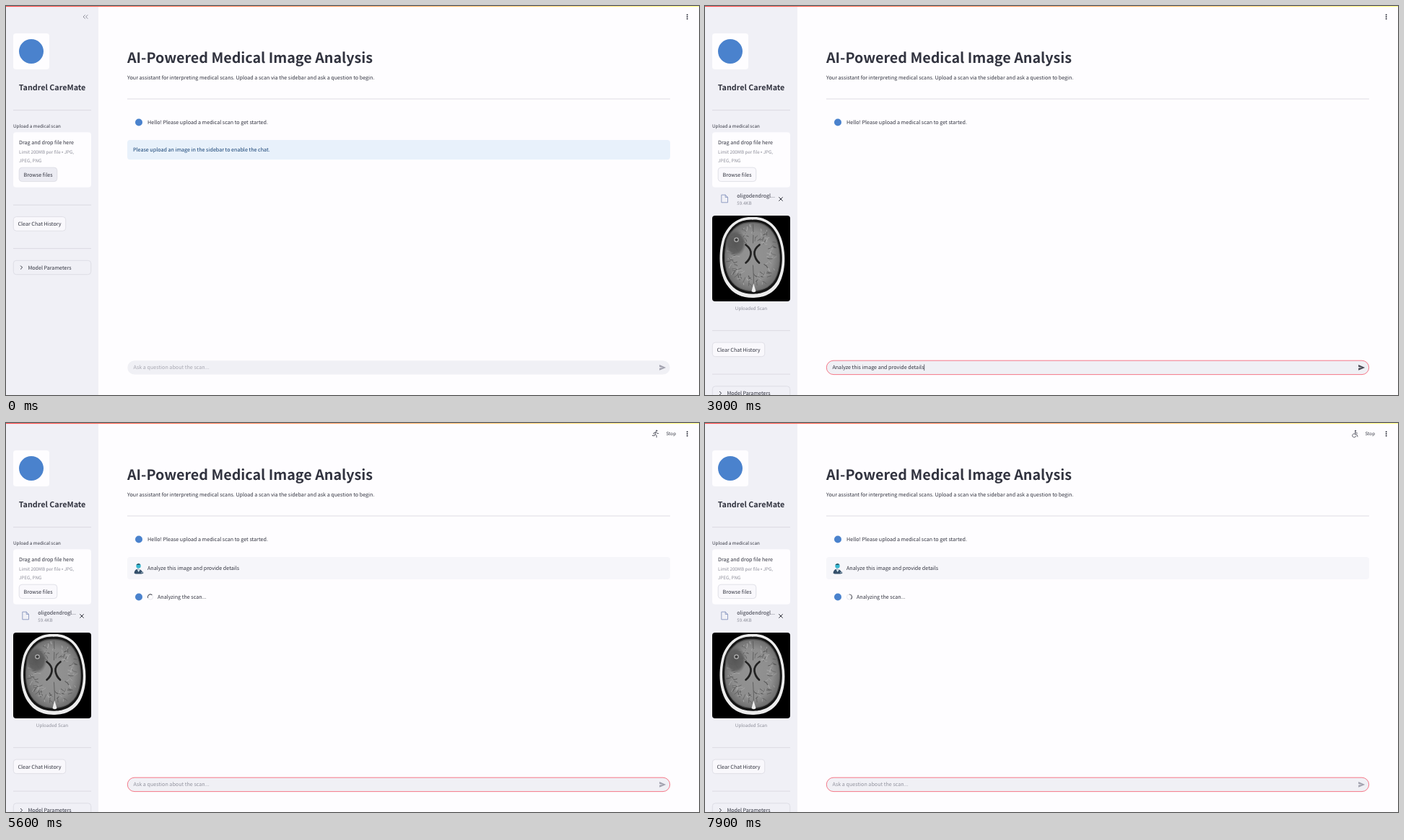
An HTML page that plays this animation: 960x540 px, repeating every 8 s.

```html
<!DOCTYPE html>
<html lang="en">
<head>
<meta charset="utf-8">
<title>Medical image assistant</title>
<style>
  html, body { margin: 0; width: 100%; height: 100%; overflow: hidden; background: #fefdff; }
  svg { display: block; width: 960px; height: 540px; }
  /* The Latin letters of the CJK face are wide for their size, hence the odd values. */
  text { font: 7.16px "Noto Sans CJK JP", "Noto Sans CJK SC", "Noto Sans CJK", "Open Sans", sans-serif;
         fill: #31333f; text-rendering: geometricPrecision; white-space: pre; }
  .small { font-size: 6.27px; }
  .dim { fill: #8c8d98; }
  .mid { text-anchor: middle; }
  .h1 { font-size: 19.7px; font-weight: 700; }
  .h2 { font-size: 10.74px; font-weight: 600; }
  .bullet { font-family: "Liberation Sans", sans-serif; }
  .rule { stroke: #dad9e0; stroke-width: .9; }
  .box { fill: #f9f8fc; stroke: #d6d6de; stroke-width: .7; }
  .line { fill: none; stroke-linecap: round; stroke-linejoin: round; }
  .mark { fill: #4a82cd; }
</style>
</head>
<body>
<svg viewBox="0 0 960 540" xmlns="http://www.w3.org/2000/svg">
  <defs>
    <linearGradient id="stripe"><stop stop-color="#ff4b4b"/><stop offset="1" stop-color="#fffd80"/></linearGradient>
    <radialGradient id="tissue"><stop stop-color="#929292"/><stop offset=".75" stop-color="#8e8e8e"/><stop offset="1" stop-color="#727272"/></radialGradient>
    <radialGradient id="lesion"><stop stop-color="#555"/><stop offset=".7" stop-color="#5c5c5c" stop-opacity=".9"/><stop offset="1" stop-color="#666" stop-opacity="0"/></radialGradient>
    <clipPath id="frame"><rect x="10" y="291" width="108" height="119" rx="4"/></clipPath>
    <path id="skull" d="M.5-56C18-57 33-47 40-27C47-7 47 19 37 37C27 53 13 56 0 56C-14 56-27 51-36 37C-47 19-47-7-41-27C-33-47-19-57 .5-56Z"/>
  </defs>

  <rect width="960" height="540" fill="#fefdff"/>
  <rect width="128" height="540" fill="#f0f0f6"/>
  <rect width="960" height="1.1" fill="url(#stripe)"/>

  <!-- sidebar -->
  <path id="collapse" class="line" d="M109.4 12.6l-2.4 2.4 2.4 2.4M113 12.6l-2.4 2.4 2.4 2.4" stroke="#82838f" stroke-width=".9"/>
  <rect x="10" y="38" width="50" height="50" rx="4" fill="#fefdff"/>
  <circle class="mark" cx="35" cy="63" r="17"/>
  <text class="h2 mid" x="64" y="117">Tandrel CareMate</text>
  <path class="rule" d="M10 144.6H118"/>
  <text class="small" x="10" y="169.2">Upload a medical scan</text>
  <rect x="10" y="175.3" width="108" height="76.5" rx="4" fill="#fefdff"/>
  <text x="18" y="192">Drag and drop file here</text>
  <text class="small dim" x="18" y="205.2">Limit 200MB per file <tspan class="bullet">•</tspan> JPG,</text>
  <text class="small dim" x="18" y="216.6">JPEG, PNG</text>
  <rect id="browse" class="box" x="18.2" y="224.2" width="52.6" height="19.4" rx="4"/>
  <text class="mid" x="44.5" y="236.6">Browse files</text>

  <g id="file">
    <path class="line" d="M23.2 262.2h5l3.3 3.3v7.3h-8.3zM28.2 262.2v3.3h3.3" stroke="#929fc4" stroke-width="1"/>
    <text x="44.2" y="265.6">oligodendrogl...</text>
    <text class="small dim" x="44.2" y="276.4">59.4KB</text>
    <path class="line" d="M102.6 265.6l4.8 4.8M107.4 265.6l-4.8 4.8" stroke="#31333f" stroke-width="1"/>
    <text id="caption" class="small dim mid" x="64" y="302.4">Uploaded Scan</text>
  </g>

  <g id="scan" clip-path="url(#frame)">
    <rect x="10" y="291" width="108" height="119"/>
    <g transform="translate(65.5 349)">
      <use href="#skull" fill="#ececec"/>
      <use href="#skull" transform="translate(0 -.8) scale(.92)" fill="#161616"/>
      <use href="#skull" transform="translate(0 -1) scale(.86)" fill="#555"/>
      <use href="#skull" transform="translate(0 -1) scale(.835)" fill="url(#tissue)"/>
    </g>
    <path class="line" d="M66.5 303q1 14 0 26M66.5 360q1.2 14 .8 30" stroke="#5a5a5a" stroke-width=".9"/>
    <g id="folds" class="line"></g>
    <ellipse cx="42" cy="329" rx="15" ry="19" fill="url(#lesion)"/>
    <circle cx="43.5" cy="324.5" r="2.7" fill="#3a3a3a" stroke="#b4b4b4" stroke-width="1.2"/>
    <path class="line" d="M56.500 331.500q8 6 7 13q-1 7-7 12M75.500 331.500q-8 6-7 13q1 7 6.500 12" stroke="#222" stroke-width="2.700"/>
    <path d="M67.3 385l3.200 11q-3 2.500-6 0z" fill="#ececec"/>
  </g>

  <g id="lower">
    <path class="rule" d="M10 276.2H118M10 336.6H118"/>
    <rect class="box" x="10.3" y="292.6" width="72.4" height="19.6" rx="4"/>
    <text class="mid" x="46.5" y="305">Clear Chat History</text>
    <rect class="box" x="10.3" y="353.3" width="107.4" height="19.4" rx="4" style="fill:none"/>
    <path class="line" d="M20.4 360.8l2.200 2.200-2.200 2.200" stroke="#31333f" stroke-width="1"/>
    <text x="30.4" y="365.6">Model Parameters</text>
  </g>

  <!-- main column -->
  <g fill="#31333f"><circle cx="943.7" cy="12.2" r="1"/><circle cx="943.7" cy="15" r="1"/><circle cx="943.7" cy="17.8" r="1"/></g>
  <g id="busy">
    <g class="line" stroke="#5a5b66" stroke-width="1">
      <g class="pose">
        <circle cx="901" cy="11" r=".7" fill="#5a5b66"/>
        <path d="M900.8 12.7l-.8 3.2h2.8l1.2 3M901 13.5l2.6.6M898.8 14.8a2.6 2.6 0 1 0 2.9 3.6"/>
      </g>
      <g class="pose">
        <circle cx="901.8" cy="11" r=".7" fill="#5a5b66"/>
        <path d="M901 12.8l-1.4 3 2.2 1.4.4 2.4M899.6 15.8l-1.3 2.2-2 .7M900.8 13l-2.6 1M901.2 13.3l2.4 1.5M897 19.5l6.5-3.4"/>
      </g>
      <g class="pose">
        <circle cx="901.2" cy="10.7" r=".7" fill="#5a5b66"/>
        <path d="M900.2 12.6l-1 3.2 2 1.5v2.6M899.2 15.8l-1 2-2.8-.4M900.2 12.6l-2.6 1-.5 1.7M900.5 12.8l1.3 1.5 2 .2"/>
      </g>
    </g>
    <text class="small" x="914.5" y="17.2">Stop</text>
  </g>

  <text class="h1" x="168" y="78.6">AI-Powered Medical Image Analysis</text>
  <text x="168" y="101.5">Your assistant for interpreting medical scans. Upload a scan via the sidebar and ask a question to begin.</text>
  <path class="rule" d="M168 129H920"/>
  <circle class="mark" cx="184" cy="161.5" r="5"/>
  <text x="196" y="164.3">Hello! Please upload a medical scan to get started.</text>

  <g id="alert">
    <rect x="168" y="186" width="752" height="27.2" rx="4" fill="#e8f1fb"/>
    <text x="176" y="202" style="fill:#123f72">Please upload an image in the sidebar to enable the chat.</text>
  </g>

  <g id="reply">
    <rect x="168" y="186" width="752" height="31" rx="4" fill="#f6f6fa"/>
    <path d="M177.5 208.5q.5-5.5 5.5-6l4 1.500 3.500 4.500-3 1h-8z" fill="#35506b"/>
    <circle cx="183.5" cy="198.5" r="3.2" fill="#35b6cf"/>
    <path d="M180.5 197q2.500-3.200 6-.5z" fill="#2b3948"/>
    <path d="M181.5 203l2 4 2.500-3.500z" fill="#d5e6ee"/>
    <path d="M187 207.8l3.500-.8" stroke="#8fa5b5" stroke-width="1.2"/>
    <text x="196" y="204.3">Analyze this image and provide details</text>
    <circle class="mark" cx="184" cy="241.5" r="5"/>
    <circle cx="200" cy="241.5" r="3.6" fill="none" stroke="#e6e6eb" stroke-width=".9"/>
    <path id="spinner" class="line" d="M196.6 240.3a3.6 3.6 0 0 1 6.8 0" stroke="#42434e" stroke-width=".95"/>
    <text x="210" y="244.3">Analyzing the scan...</text>
  </g>

  <!-- chat input -->
  <rect id="field" x="168.3" y="492.2" width="751.4" height="19.4" rx="9.7" fill="#f0f0f5" stroke-width=".8"/>
  <text id="entry" x="176.4" y="504.3"></text>
  <path id="caret" d="M0 497.5v8.6" stroke="#31333f" stroke-width=".7"/>
  <path id="send" d="M905.2 498l9 3.900-9 3.900v-3l5.400-.9-5.400-.9z"/>
  <path id="pointer" d="M316.6 490.2v7.600l1.800-1.600 1.200 2.700 1.200-.5-1.200-2.700h2.300z" fill="#fff" stroke="#222" stroke-width=".7"/>
  <g id="blocked" fill="none" stroke="#c9202f" stroke-width="1.4">
    <path d="M905 497.5v6l2 1.500" stroke="#333" stroke-width=".6"/>
    <circle cx="907.8" cy="500.6" r="3.2"/><path d="M905.6 498.4l4.400 4.400"/>
  </g>
</svg>

<script>
const LOOP = 8000;
const T = { hide: 100, file: 300, pointer: 600, scan: 1000, idle: 1200, focus: 2800, paste: 2900, submit: 3700, leave: 5400 };
const PROMPT = "Analyze this image and provide details";
const HINT = "Ask a question about the scan...";

const el = id => document.getElementById(id);
const poses = [...document.querySelectorAll(".pose")];
const show = (node, on) => node.setAttribute("display", on ? "inline" : "none");
const within = (t, a, b) => t >= a && t < b;

// Short seeded strokes around the rim stand for the brain folds.
function drawFolds() {
  let seed = 11;
  const rnd = () => (seed = seed * 16807 % 2147483647) / 2147483647;
  let out = "";
  for (let i = 0; i < 120; i++) {
    const a = rnd() * Math.PI * 2, r = .6 + .38 * rnd();
    const x = 65.5 + 37 * r * Math.cos(a), y = 348 + 46 * r * Math.sin(a);
    const len = 2 + 5 * rnd(), turn = a + (rnd() - .5) * 2;
    const dx = -len * Math.cos(turn), dy = -len * Math.sin(turn);
    const bend = (rnd() - .5) * 3;
    out += `<path d="M${x} ${y}q${dx / 2 + bend} ${dy / 2 - bend} ${dx} ${dy}" stroke="${i % 2 ? "#5a5a5a" : "#a8a8a8"}" stroke-width="${.6 + .6 * rnd()}"/>`;
  }
  el("folds").innerHTML = out;
}

function render(t) {
  const scan = t >= T.scan, focus = t >= T.focus;
  const typed = within(t, T.paste, T.submit);

  show(el("collapse"), t < T.hide);
  show(el("file"), t >= T.file);
  show(el("scan"), scan);
  el("browse").style.fill = t < T.hide ? "#ececf3" : "";
  el("caption").setAttribute("y", scan ? 421.7 : 302.4);
  el("lower").setAttribute("transform", `translate(0 ${scan ? 174.5 : t >= T.file ? 55 : 0})`);
  show(el("alert"), !scan);
  show(el("reply"), t >= T.submit);

  show(el("busy"), within(t, T.file, T.idle) || t >= T.submit);
  const pose = Math.floor((t + 100) % 1000 * 3 / 1000);
  poses.forEach((p, i) => show(p, i === pose));
  el("spinner").setAttribute("transform", `rotate(${35 + (t - 4800) * .36} 200 241.5)`);

  el("field").setAttribute("stroke", focus ? "#f4586c" : "none");
  const entry = el("entry");
  entry.textContent = typed ? PROMPT : HINT;
  entry.style.fill = typed ? "#31333f" : scan ? "#92939e" : "#a8a8b2";
  const x = typed ? 176.6 + entry.getComputedTextLength() : 176.8;
  el("caret").setAttribute("transform", `translate(${x} 0)`);
  show(el("caret"), focus && t % 1000 < 500);
  el("send").setAttribute("fill", typed ? "#454650" : "#a0a0ad");

  show(el("pointer"), within(t, T.pointer, T.scan));
  show(el("blocked"), within(t, T.submit, T.leave));
}

function tick(now) {
  render(now % LOOP);
  requestAnimationFrame(tick);
}

drawFolds();
render(0);
requestAnimationFrame(tick);
</script>
</body>
</html>
```
